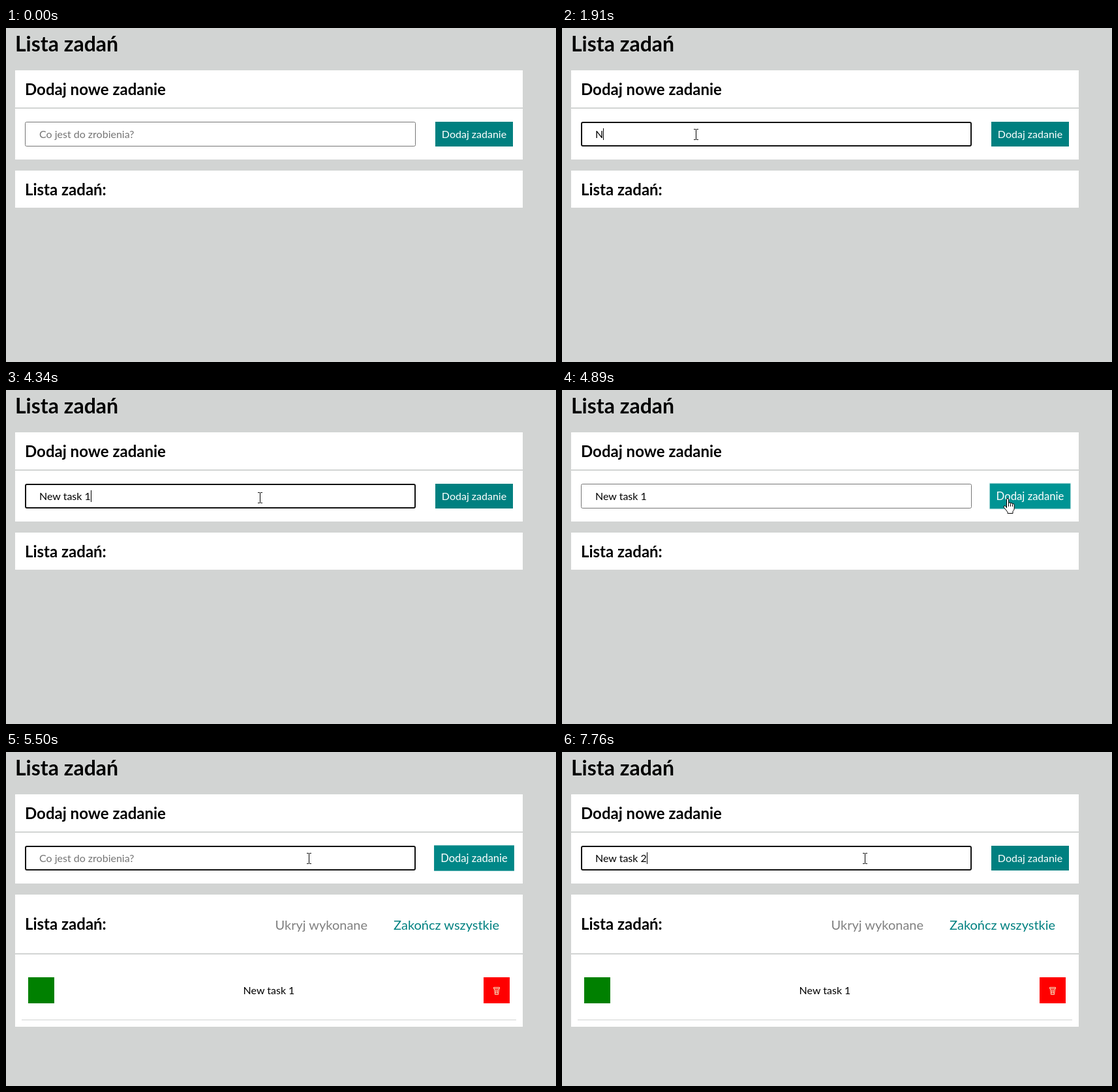
These frames come from a looping animation (843 by 513 pixels, 8 s). An HTML page:

```html
<!DOCTYPE html>
<html lang="pl">
<head>
<meta charset="utf-8">
<style>
  html, body { margin: 0; height: 100%; overflow: hidden; background: #d2d4d3; }
  svg { display: block; }
  text { font: 16px Lato, sans-serif; white-space: pre; }
  .h1 { font-size: 32px; font-weight: 700; }
  .h2 { font-size: 24px; font-weight: 700; }
  .link { font-size: 20px; }
</style>
</head>
<body>
<svg width="843" height="513" viewBox="0 0 843 513">
  <text class="h1" x="14" y="36">Lista zadań</text>

  <path fill="#fff" d="M14 65H792V122H14ZM14 124H792V202H14Z"/>
  <text class="h2" x="29" y="103">Dodaj nowe zadanie</text>
  <rect id="field" fill="#fff"/>
  <text id="value" x="51" y="169"></text>
  <rect id="caret" y="154" width="1" height="18"/>
  <g id="button">
    <rect id="face" x="658" y="144" width="119" height="38"/>
    <text x="717.5" y="169" fill="#fff" text-anchor="middle">Dodaj zadanie</text>
  </g>

  <rect id="card" x="14" y="219" width="778" fill="#fff"/>
  <text id="heading" class="h2" x="29">Lista zadań:</text>
  <g id="list">
    <text class="link" x="412.5" y="273" fill="#808080">Ukryj wykonane</text>
    <text class="link" x="594" y="273" fill="#008080">Zakończ wszystkie</text>
    <path fill="#d2d4d3" d="M14 309H792V311H14ZM24 411H782V412H24Z"/>
    <rect x="34" y="346" width="40" height="40" fill="#008000"/>
    <text x="403" y="372" text-anchor="middle">New task 1</text>
    <rect x="732" y="346" width="40" height="40" fill="#f00"/>
    <g fill="none" stroke="#f5e3c0">
      <path d="M747.5 361.5H756.5V363.5H747.5ZM748.5 364L749.5 372.5H754.5L755.5 364"/>
      <path d="M750.5 365V371M752 365V371M753.5 365V371" stroke-width=".8"/>
    </g>
  </g>

  <g id="mouse">
    <path id="arrow" fill="#fff" stroke="#000" d="M.5 .5V16.5L4.2 13L6.8 19L9.2 18L6.6 12H11.8Z"/>
    <path id="beam" d="M-3-8H0V-7H-3ZM1-8H4V-7H1ZM0-7H1V8H0ZM-3 8H0V9H-3ZM1 8H4V9H1Z"/>
    <path id="hand" fill="#fff" stroke="#000" stroke-linejoin="round"
      d="M-1.5 15V2Q-1.5 .5 0 .5T1.5 2V8Q1.5 6.8 3 6.8T4.5 8.3Q4.6 7.6 6 7.6T7.5 9.2Q7.8 8.5 9 8.8T10.2 10.5V16Q10.2 18.5 8 20.5V23.5H0V21.5L-5.5 14.5Q-6.5 13-5.3 12T-2.8 12.8Z M1.5 8V13M4.5 8.5V13M7.5 9.5V13"/>
  </g>
</svg>
<script>
const $ = id => document.getElementById(id);
const LOOP = 8000, ENTER = 140, FOCUS = 790, HOVER = 4600, PRESS = 4820, ADDED = 4960, LEAVE = 5130;
const BLINK = 500;
const HINT = 'Co jest do zrobienia?';

// Each burst types its keys after the text already there, one per gap
const bursts = [
  { at: FOCUS, before: '', keys: '', gap: 0 },
  { at: 1910, before: '', keys: 'New task', gap: 147 },
  { at: 3890, before: 'New task', keys: ' 1', gap: 150 },
  { at: ADDED, before: '', keys: '', gap: 0 },
  { at: 6110, before: '', keys: 'New task 2', gap: 183 }
];
const moves = [
  { at: ENTER, time: 550, x: 205, y: 163 },
  { at: 4110, time: 550, x: 688, y: 168 },
  { at: 4660, time: 340, x: 681, y: 165 },
  { at: 5050, time: 440, x: 464, y: 163 }
];

function ease(t, start, time) {
  const u = Math.min(1, Math.max(0, (t - start) / time));
  return u * u * (3 - 2 * u);
}

// Rises when the pointer arrives at the button, falls when it leaves
const hover = (t, time) => ease(t, HOVER, time) * (1 - ease(t, LEAVE, 600));

function set(id, attrs) {
  for (const name in attrs) $(id).setAttribute(name, attrs[name]);
}

const show = (id, on) => set(id, { visibility: on ? 'visible' : 'hidden' });

function typed(t) {
  const burst = bursts.filter(b => b.at <= t).pop();
  if (!burst) return { text: '', last: t };
  const { at, before, keys, gap } = burst;
  const count = keys && Math.min(keys.length, 1 + Math.floor((t - at) / gap));
  return { text: before + keys.slice(0, count), last: at + gap * Math.max(0, count - 1) };
}

function drawField(t) {
  const focused = t >= FOCUS && t < PRESS || t >= ADDED;
  const w = focused ? 2 : 1;
  set('field', {
    x: 29 + w / 2, y: 144 + w / 2, width: 599 - w, height: 38 - w, rx: 2,
    stroke: focused ? '#101010' : '#767676', 'stroke-width': w
  });
  const { text, last } = typed(t);
  const value = $('value');
  value.textContent = text || HINT;
  set('value', { fill: text ? '#000' : '#757575' });
  set('caret', { x: 51 + (text && Math.round(value.getComputedTextLength())) * 1 });
  show('caret', focused && Math.floor((t - last) / BLINK) % 2 === 0);
}

function drawButton(t) {
  const scale = 1 + 0.1 * hover(t, 600);
  const level = 128 + 20 * hover(t, 200);
  const pressed = t >= PRESS && t < ADDED;
  set('button', { transform: `translate(717.5 163) scale(${scale}) translate(-717.5 -163)` });
  set('face', { fill: `rgb(0 ${level} ${level})`, stroke: pressed ? '#d9eeee' : 'none' });
}

function drawList(t) {
  const filled = t >= ADDED;
  set('card', { height: filled ? 203 : 57 });
  set('heading', { y: filled ? 273 : 257 });
  show('list', filled);
}

function drawMouse(t) {
  let x = 712, y = 500;
  for (const m of moves) {
    const u = ease(t, m.at, m.time);
    x += (m.x - x) * u;
    y += (m.y - y) * u;
  }
  const inRow = y >= 144 && y < 182;
  const shape = inRow && x >= 29 && x < 628 ? 'beam'
    : inRow && x >= 657 && x < 778 ? 'hand' : 'arrow';
  set('mouse', { transform: `translate(${Math.round(x)} ${Math.round(y)})` });
  for (const id of ['arrow', 'beam', 'hand']) show(id, t >= ENTER && id === shape);
}

function frame() {
  const t = performance.now() % LOOP;
  drawField(t);
  drawButton(t);
  drawList(t);
  drawMouse(t);
  requestAnimationFrame(frame);
}
frame();
</script>
</body>
</html>
```
